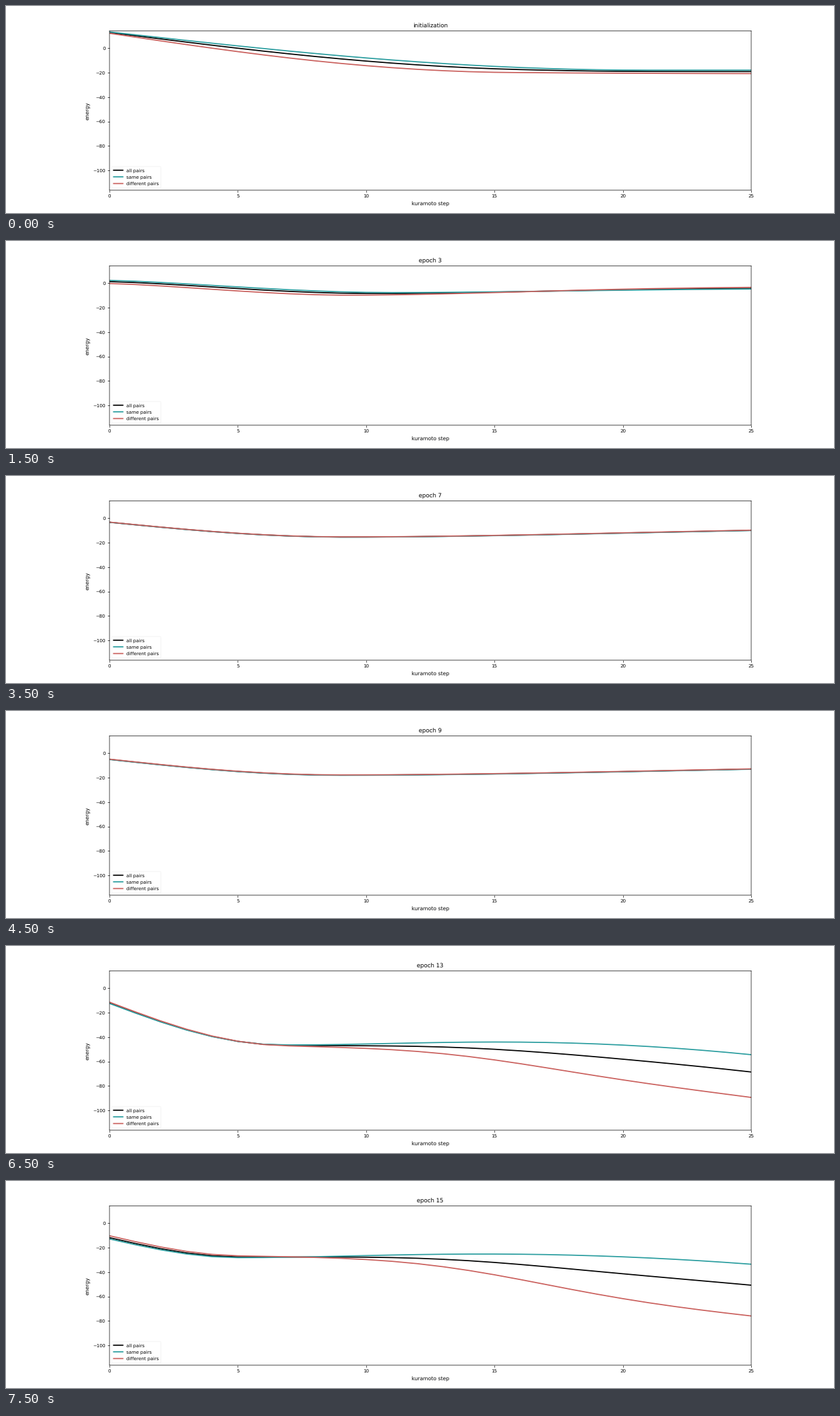
A matplotlib script that plays this animation: 1280 by 320 pixels, repeating every 8000 ms.

```python
import numpy as np
import matplotlib.pyplot as plt
from matplotlib.animation import FuncAnimation

EPOCHS = 16
STEPS = np.arange(26)
DIFFERENT_SHARE = 0.405

# Curve settings at key epochs; epochs between them are interpolated.
DEFAULTS = dict(start=0, drop=0, reach=10, lag=1, rise=0, settle=8.8,
                sink=0, lead=0, pull=0, split=0)
POSES = {
    0: dict(start=13.4, drop=31.3, reach=21, lead=-1.1, pull=0.25, split=1.8),
    1: dict(start=5, drop=11, reach=11, lag=1.3, rise=3, settle=10,
            lead=-2.6, pull=0.12, split=-4),
    3: dict(start=2.4, drop=10, reach=11, lag=1.3, rise=3.5, settle=10,
            lead=-2.6, pull=0.12, split=-4),
    5: dict(start=-1.5, drop=11.3, reach=9.5, rise=8.3, settle=14, split=-0.3),
    9: dict(start=-5.1, drop=12.9, reach=9, rise=11.5, settle=22, lead=0.3),
    10: dict(start=-9, drop=44.5, reach=9, rise=30, settle=12, split=2),
    11: dict(start=-12.7, drop=31, reach=6.5, rise=38.8, split=6.5),
    13: dict(start=-12.4, drop=33.6, reach=6.7, rise=10, sink=18.1,
             lead=1.3, split=38.5),
    14: dict(start=-12.6, drop=23, reach=5.8, rise=9, sink=15,
             lead=2.2, split=37),
    15: dict(start=-12.8, drop=15.2, reach=5, rise=8, sink=13.4,
             lead=2.9, split=48),
}


def pose(epoch):
    keys = list(POSES)
    return {name: np.interp(epoch, keys, [POSES[k].get(name, value) for k in keys])
            for name, value in DEFAULTS.items()}


def descend(p, reach):
    """Fall to a minimum at step `reach`, recover, then sink again."""
    fall = np.sin(np.pi / 2 * np.minimum(STEPS / reach, 1) ** p["lag"])
    after = np.maximum(STEPS - reach, 0) / p["settle"]
    recover = 1 - np.exp(-after ** 1.8)
    sink = (STEPS / STEPS[-1]) ** 3
    return p["start"] - p["drop"] * fall + p["rise"] * recover - p["sink"] * sink


def energies(epoch):
    p = pose(epoch)
    same = descend(p, p["reach"])
    apart = 1 / (1 + np.exp(-0.315 * (STEPS - 16.1)))
    different = (descend(p, p["reach"] * (1 - p["pull"]))
                 + p["lead"] - p["split"] * apart)
    return same + DIFFERENT_SHARE * (different - same), same, different


plt.rcParams.update({
    "font.family": "DejaVu Sans",
    "text.hinting": "none",
    "path.snap": False,
    "axes.titlesize": 10,
    "axes.labelsize": 9,
    "xtick.labelsize": 8,
    "ytick.labelsize": 8,
    "legend.fontsize": 8,
})

fig, ax = plt.subplots(figsize=(20, 5), dpi=64)
fig.subplots_adjust(left=0.125, right=0.9, bottom=0.11, top=0.88)

styles = [("all pairs", "black"), ("same pairs", "#2a9d9f"),
          ("different pairs", "#ca605d")]
lines = [ax.plot([], [], color=c, lw=2, label=name)[0] for name, c in styles]

ax.set(xlim=(0, 25), ylim=(-116.2, 14.3), xlabel="kuramoto step", ylabel="energy")
ax.set_xticks(range(0, 26, 5))
ax.set_yticks(range(-100, 1, 20))
ax.legend(loc="lower left", edgecolor="0.94")
title = ax.set_title("initialization")


def update(epoch):
    title.set_text(f"epoch {epoch}" if epoch else "initialization")
    for line, values in zip(lines, energies(epoch)):
        line.set_data(STEPS, values)
    return [title, *lines]


anim = FuncAnimation(fig, update, frames=EPOCHS, interval=500, repeat=True,
                     repeat_delay=0, blit=False)
plt.show()
```
